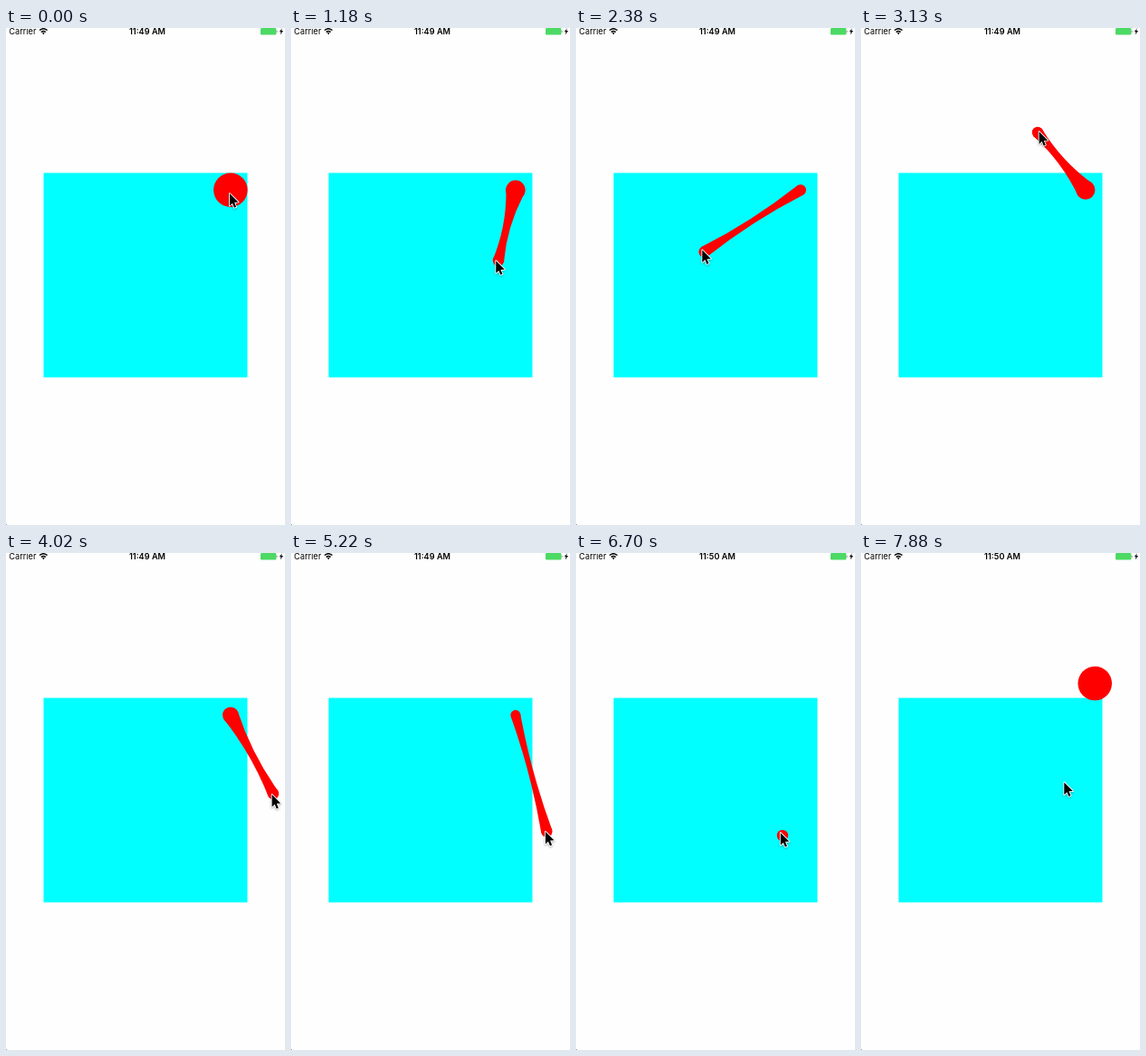
Write an HTML page that moves like this. It is 308 px wide and 547 px high and loops after 8000 ms.

```html
<!DOCTYPE html>
<html lang="en">
<head>
<meta charset="utf-8">
<title>Sticky drag</title>
<style>
  html, body { margin: 0; width: 100%; height: 100%; overflow: hidden; background: #fefefe; }
  svg { display: block; width: 308px; height: 547px; }
  text { font-family: Inter, Roboto, sans-serif; font-size: 9.2px; fill: #000; }
  .clock { font-weight: 600; text-anchor: middle; }
  .cursor { filter: drop-shadow(0 1px 1px rgba(0, 0, 0, .3)); }
</style>
</head>
<body>
<svg viewBox="0 0 308 547">
  <rect width="308" height="547" fill="#fefefe"/>
  <rect y="546" width="1" height="1" fill="#999"/>

  <text x="3.3" y="7.4">Carrier</text>
  <g fill="none" stroke="#000" stroke-width="1.4">
    <path d="M37 2.6Q41.3-1.2 45.6 2.6M38.8 4.5Q41.3 2.4 43.8 4.5"/>
    <path d="M39.9 5.6Q41.3 4.5 42.7 5.6L41.3 7.2Z" fill="#000" stroke="none"/>
  </g>
  <text id="clock" class="clock" x="156" y="7.4">11:49 AM</text>
  <rect x="281" width="17.4" height="7.6" rx="1.4" fill="#4cd964"/>
  <path d="M298.8 2.4Q300.2 3.8 298.8 5.2Z" fill="#222"/>
  <path d="M304.8 .2L301.8 4.3H303.6L302.8 7.4L306 3.1H304.1Z"/>

  <rect x="41.5" y="159.5" width="225" height="225" fill="#0ff"/>
  <g fill="#f00">
    <path id="bridge"/>
    <circle id="anchor"/>
    <circle id="knob"/>
  </g>
  <path id="cursor" class="cursor" stroke="#fff" stroke-width="1.8" paint-order="stroke" stroke-linejoin="round"
    d="M0 0V13.6L3.1 10.8L5.1 15.6L7.2 14.7L5.2 9.9L9.6 9.6Z"/>
</svg>
<script>
  const LOOP = 8000, STEP = 148.7, LEAD = 10;
  const GRAB = 2, RELEASE = 52, NEW_MINUTE = 37;  // in steps
  const HOME = [247.9, 178.3], FULL = 18.75, SMALL = 6.2;
  const SNAP = 145, BOUNCE = -.465;

  // Turning points of the drag: step, x, y
  const turns = [
    [1, 248.3, 182.7], [5, 264, 221], [8, 229, 256], [12, 186, 266],
    [16, 141.7, 246.3], [18, 138, 203], [21, 195, 115], [24, 284, 176],
    [27, 295, 265], [35, 282.3, 306.5], [38, 288, 331], [41, 266, 338],
    [45, 228, 311], [46, 226, 273], [48, 225.7, 255], [52, 225.7, 253]
  ];

  const slope = (i, axis) => {
    const a = turns[Math.max(i - 1, 0)], b = turns[Math.min(i + 1, turns.length - 1)];
    return (b[axis] - a[axis]) / (b[0] - a[0]);
  };

  // Smooth curve through the turning points
  function pointAt(step) {
    const next = turns.findIndex(turn => turn[0] > step);
    if (next === 0) return turns[0].slice(1);
    if (next < 0) return turns.at(-1).slice(1);
    const a = turns[next - 1], b = turns[next], span = b[0] - a[0];
    const u = (step - a[0]) / span, v = 1 - u;
    return [1, 2].map(axis =>
      v * v * (1 + 2 * u) * a[axis] + u * u * (3 - 2 * u) * b[axis] +
      span * u * v * (v * slope(next - 1, axis) - u * slope(next, axis)));
  }

  const distance = ([x, y]) => Math.hypot(x - HOME[0], y - HOME[1]);
  let snapStep = GRAB;
  while (distance(pointAt(snapStep)) < SNAP) snapStep++;

  const [clock, bridge, anchor, knob, cursor] =
    ['clock', 'bridge', 'anchor', 'knob', 'cursor'].map(id => document.getElementById(id));

  function setCircle(node, [x, y], r) {
    node.setAttribute('cx', x);
    node.setAttribute('cy', y);
    node.setAttribute('r', r);
  }

  // Two curves pinched at the midpoint between the circles
  function bridgePath([x, y], r) {
    const d = distance([x, y]);
    const nx = (HOME[1] - y) / d, ny = (x - HOME[0]) / d;
    const mid = `${(x + HOME[0]) / 2} ${(y + HOME[1]) / 2}`;
    const side = (px, py, s) => `${px + nx * s} ${py + ny * s}`;
    return `M${side(...HOME, r)}Q${mid} ${side(x, y, SMALL)}` +
      `L${side(x, y, -SMALL)}Q${mid} ${side(...HOME, -r)}Z`;
  }

  function draw(step) {
    const point = pointAt(step), tip = pointAt(step + .12);
    const dragging = step >= GRAB && step < RELEASE;
    const attached = dragging && step < snapStep;
    const radius = FULL - distance(point) / 10;

    const swing = step < RELEASE ? 0 : BOUNCE ** (step - RELEASE);
    const center = HOME.map((h, i) => h + (point[i] - h) * swing);
    setCircle(anchor, center, attached ? radius : dragging ? 0 : FULL);
    setCircle(knob, point, dragging ? SMALL : 0);
    bridge.setAttribute('d', attached ? bridgePath(point, radius) : '');
    cursor.setAttribute('transform', `translate(${tip[0] - 1.4} ${tip[1] - .6})`);
    clock.textContent = step < NEW_MINUTE ? '11:49 AM' : '11:50 AM';
  }

  const began = performance.now();
  function frame() {
    const t = (performance.now() - began) % LOOP;
    draw(Math.floor((t + LEAD) / STEP));
    requestAnimationFrame(frame);
  }
  frame();
</script>
</body>
</html>
```
